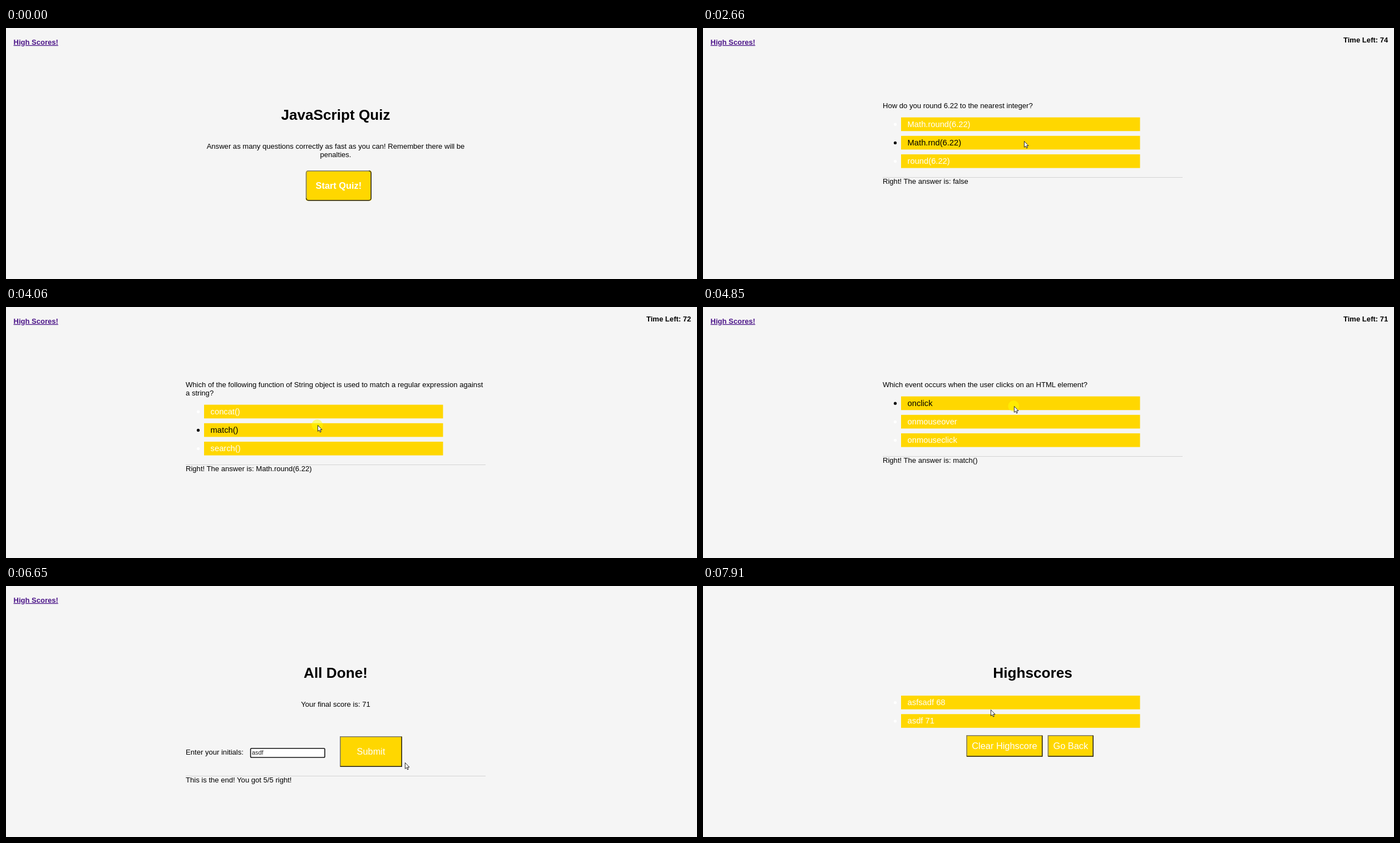
Write an HTML page that moves like this. It is 1242 by 451 pixels and loops after 7990 ms.

```html
<!DOCTYPE html>
<html lang="en">
<head>
<meta charset="utf-8">
<title>Quiz</title>
<style>
  html, body { margin: 0; width: 100%; height: 100%; overflow: hidden; background: #f5f5f5; }
  svg { display: block; width: 100%; height: 100%; font: 13.09px "Liberation Sans", Arial, sans-serif; }
  text { white-space: pre; }
  .mid { text-anchor: middle; }
  .end { text-anchor: end; }
  .bold, .h1 { font-weight: bold; }
  .h1 { font-size: 26.16px; }
  .opt { font-size: 14.72px; }
  .btn { font-size: 16.35px; }
  .field { font-size: 10.9px; fill: #222; }
  .link { font-size: 13px; fill: #4b1488; text-decoration: underline; }
  .hot { fill: #fff; }
  .hot.on { fill: #000; }
  .hot rect { fill: #ffd700; }
  .edge { fill: none; stroke-width: 1.5; }
  .rule { fill: #d3d3d3; }
  #box { fill: #fff; stroke: #767676; stroke-width: 1.3; }
  #box.on { stroke: #444; }
  #box.focus { stroke: #101010; stroke-width: 1.6; }
  #halo { fill: #ff0; fill-opacity: .5; }
  #arrow { fill: #fff; stroke: #111; stroke-width: .9; }
  #beam { fill: none; stroke: #222; }
</style>
</head>
<body>
<svg id="stage" viewBox="0 0 1242 451" xmlns="http://www.w3.org/2000/svg"></svg>
<script>
const LOOP = 7990, STEP = 78;
const LEFT = 323, MID = 592.5, LINE = 15, ROW = 33.2;
const TYPING = 5870, FOCUS = 5630;
const stage = document.getElementById('stage');

const text = (x, y, s, cls = '') => `<text x="${x}" y="${y}" class="${cls}">${s}</text>`;
const title = s => text(MID, 165, s, 'mid h1');
const intro = lines => lines.map((s, i) => text(MID, 216.5 + i * LINE, s, 'mid')).join('');
const link = text(13.6, 29.8, 'High Scores!', 'bold link');

const option = (s, y) => `<g class="hot"><rect x="356" y="${y}" width="429.5" height="24.6"/>
  <circle cx="345.5" cy="${y + 12.6}" r="2.6"/>${text(367.6, y + 17.2, s, 'opt')}</g>`;
const options = (list, y) => list.map((s, i) => option(s, y + i * ROW)).join('');

const result = (s, y) => `<rect class="rule" x="${LEFT}" y="${y}" width="539" height="1"/>`
  + text(LEFT, y + 12, s);

// Gold button with a light upper left and a dark lower right edge
function button(s, x, y, w, h, r = 0, cls = '') {
  const l = x + .8, t = y + .8, W = w - 1.6, H = h - 1.6;
  const arc = (dx, dy) => `a${r} ${r} 0 0 1 ${dx} ${dy}`;
  const upper = `M${l} ${t + H - r}V${t + r}${arc(r, -r)}H${l + W - r}`;
  const lower = `M${l + W - r} ${t}${arc(r, r)}V${t + H - r}${arc(-r, r)}H${l + r}${arc(-r, -r)}`;
  return `<g class="hot"><rect x="${x}" y="${y}" width="${w}" height="${h}" rx="${r}"/>
    <path class="edge" stroke="#767676" d="${upper}"/><path class="edge" stroke="#1c1c1c" d="${lower}"/>
    ${text(x + w / 2, y + h / 2 + 5.8, s, 'mid btn ' + cls)}</g>`;
}

function question(lines, answers, last) {
  const top = 160.6 + (lines.length - 1) * LINE;
  return link + lines.map((s, i) => text(LEFT, 144 + i * LINE, s)).join('') + options(answers, top)
    + (last ? result('Right! The answer is: ' + last, Math.round(top + answers.length * ROW + 7.6)) : '');
}

const scenes = [
  { at: 0, html: link + title('JavaScript Quiz')
    + intro(['Answer as many questions correctly as fast as you can! Remember there will be', 'penalties.'])
    + button('Start Quiz!', 538.8, 256, 118.2, 54.5, 4, 'bold') },
  { at: 860, html: question(['Is JavaScript a case-sensitive language?'], ['true', 'false']) },
  { at: 1880, html: question(['Is JavaScript the same language as Java?'], ['true', 'false'], 'true') },
  { at: 2660, html: question(['How do you round 6.22 to the nearest integer?'],
    ['Math.round(6.22)', 'Math.rnd(6.22)', 'round(6.22)'], 'false') },
  { at: 3370, html: question(
    ['Which of the following function of String object is used to match a regular expression against', 'a string?'],
    ['concat()', 'match()', 'search()'], 'Math.round(6.22)') },
  { at: 4140, html: question(['Which event occurs when the user clicks on an HTML element?'],
    ['onclick', 'onmouseover', 'onmouseclick'], 'match()') },
  { at: 4930, html: link + title('All Done!') + intro(['Your final score is: 71'])
    + text(LEFT, 303, 'Enter your initials:')
    + '<rect id="box" x="439.6" y="291.8" width="133.4" height="16.2" rx="1.8"/>'
    + '<text id="typed" class="field" x="442" y="303.3"></text><rect id="caret" y="293.5" width=".8" height="12.5"/>'
    + button('Submit', 600, 270, 112, 55)
    + result('This is the end! You got 5/5 right!', 341) },
  { at: 7200, html: title('Highscores') + options(['asfsadf 68', 'asdf 71'], 197)
    + button('Clear Highscore', 473.3, 268, 137.2, 38.8) + button('Go Back', 619.6, 268, 82.4, 38.8) }
];
const [QUIZ, DONE, SCORES] = [scenes[2].at, scenes[6].at, scenes[7].at];

// Each move runs from where the last one ended, bent towards `via` if given
const entry = [1130, 462];
const moves = [
  { at: 140, steps: 6, via: [700, 168], to: [613, 273] },
  { at: 1170, steps: 4, to: [590, 182] },
  { at: 2040, steps: 2, to: [577, 203] },
  { at: 2740, steps: 3, to: [571, 178] },
  { at: 3520, steps: 6, to: [560, 212] },
  { at: 4370, steps: 4, to: [559, 178] },
  { at: 5080, steps: 6, via: [592, 262], to: [534, 296] },
  { at: 6410, steps: 4, to: [717, 317] },
  { at: 6730, steps: 3, to: [683, 309] },
  { at: 7670, steps: 4, to: [517, 222] }
];
// Every page change follows a click by one screen refresh
const clicks = [FOCUS, ...scenes.slice(1).map(s => s.at - 80)];

stage.innerHTML = scenes.map(s => `<g class="scene">${s.html}</g>`).join('')
  + text(1231.4, 26, '', 'bold end timer')
  + `<g id="pointer"><circle id="halo" cx="-.7" r="10"/>
     <path id="arrow" d="M.4 .5V11.4L2.9 9.1L4.6 13L6.3 12.2L4.7 8.5H8Z"/>
     <path id="beam" d="M-3 -6.5H3M-3 8.5H3M0 -6.5V8.5"/></g>`;

const pages = [...stage.querySelectorAll('.scene')];
const hots = pages.map(p => [...p.querySelectorAll('.hot')]);
const [timer, pointer, halo, arrow, beam, box, typed, caret] =
  ['.timer', '#pointer', '#halo', '#arrow', '#beam', '#box', '#typed', '#caret'].map(q => stage.querySelector(q));

const show = (el, on) => { el.style.display = on ? '' : 'none'; };
const within = (t, from, to) => t >= from && t < to;
const latest = (list, t) => list.filter(e => e.at <= t).length - 1;

function inside(rect, x, y) {
  const [l, t, w, h] = ['x', 'y', 'width', 'height'].map(k => rect[k].baseVal.value);
  return x >= l && x <= l + w && y >= t && y <= t + h;
}

function pointerAt(t) {
  const n = latest(moves, t);
  if (n < 0) return entry.map(v => v * 2);
  const { at, steps, via, to } = moves[n];
  const from = n ? moves[n - 1].to : entry;
  const p = Math.min(1, (Math.floor((t - at) / STEP) + 1) / steps), q = 1 - p;
  return to.map((end, i) => {
    const bend = via ? via[i] : (from[i] + end) / 2;
    return q * q * from[i] + 2 * q * p * bend + p * p * end;
  });
}

function draw(t) {
  const n = latest(scenes, t);
  const [x, y] = pointerAt(t);
  pages.forEach((p, i) => show(p, i === n));
  hots[n].forEach(h => h.classList.toggle('on', inside(h.firstElementChild, x, y)));

  show(timer, within(t, QUIZ, DONE));
  timer.textContent = 'Time Left: ' + (74 - Math.floor((t - QUIZ + 60) / 1000));

  const overBox = within(t, DONE, SCORES) && inside(box, x, y);
  box.classList.toggle('on', overBox);
  box.classList.toggle('focus', within(t, FOCUS, SCORES - 80));
  typed.textContent = 'asdf'.slice(0, Math.max(0, Math.floor((t - TYPING) / 76) + 1));
  show(caret, within(t, FOCUS, 6650));
  if (n === 6) caret.setAttribute('x', 442 + typed.getComputedTextLength());

  pointer.setAttribute('transform', `translate(${x} ${y})`);
  show(pointer, !within(t, TYPING, 6410));
  show(halo, clicks.some(c => within(t, c, c + 80)));
  show(arrow, !overBox);
  show(beam, overBox);
}

const start = performance.now();
function tick() {
  draw((performance.now() - start) % LOOP);
  requestAnimationFrame(tick);
}
tick();
</script>
</body>
</html>
```
